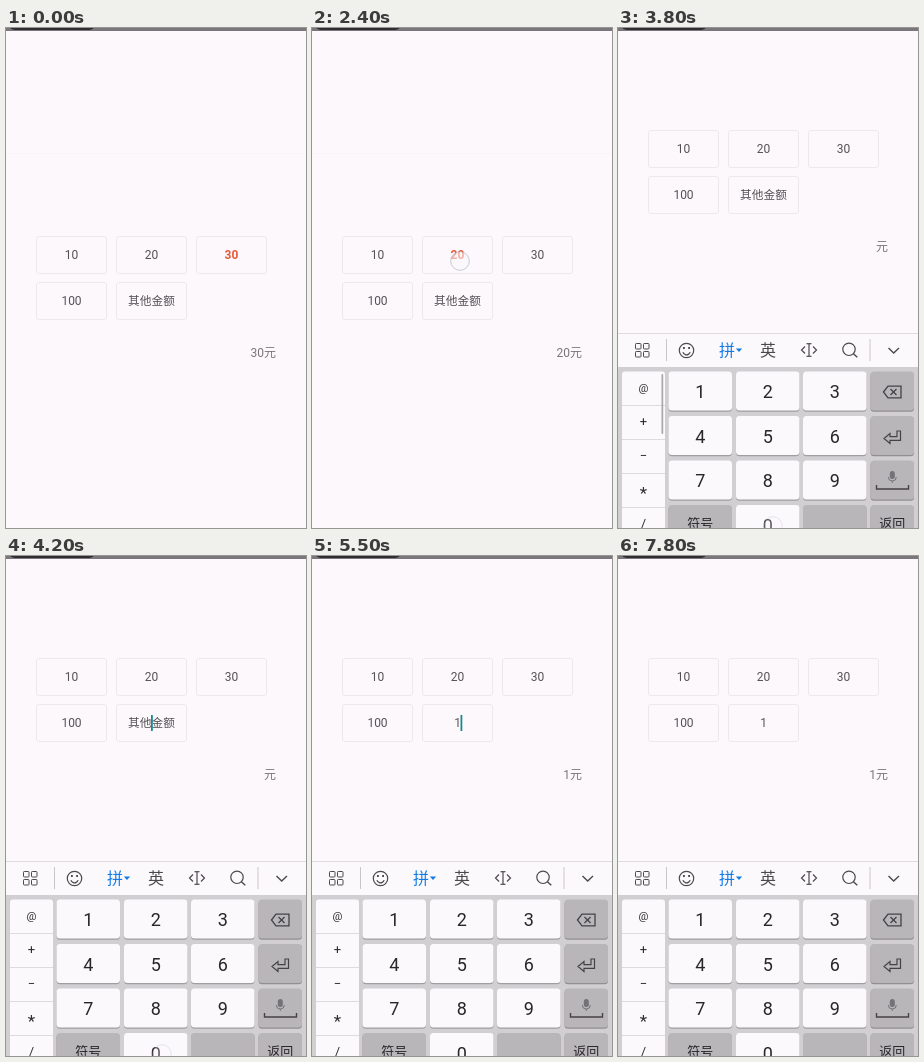
Recreate the animation shown at these times as an HTML page with a canvas. Size 300 by 500 pixels, loop 8000 ms.

```html
<!DOCTYPE html>
<html lang="zh-CN">
<head>
<meta charset="utf-8">
<title>金额选择</title>
<style>
  html, body { margin: 0; width: 100%; height: 100%; overflow: hidden; background: #fcf8fc; }
  canvas { display: block; width: 300px; height: 500px; }
</style>
</head>
<body>
<canvas id="stage" width="300" height="500"></canvas>
<script>
const ctx = document.getElementById('stage').getContext('2d');
const LOOP = 8000;
const TAP_LENGTH = 400;
const FONT = 'Roboto, "Noto Sans CJK SC", "Noto Sans CJK", sans-serif';
const BG = '#fcf8fc', INK = '#555256', ACCENT = '#e9593b', KEY = '#fcf9fd', KEY_DARK = '#b9b6ba';

const AMOUNTS = [
  { label: '10', x: 30, y: 208 }, { label: '20', x: 110, y: 208 }, { label: '30', x: 190, y: 208 },
  { label: '100', x: 30, y: 254 }, { label: '其他金额', x: 110, y: 254 }
];
const COLUMNS = [50.5, 118, 185, 252.5];
const ROWS = [343.5, 388, 432.5, 477];
const KEYS = [
  ['1', '2', '3', 'delete'], ['4', '5', '6', 'enter'],
  ['7', '8', '9', 'space'], ['符号', '0', '.', '返回']
];
const TAPS = [
  { at: 100, x: 56, y: 231 }, { at: 1700, x: 63, y: 233 }, { at: 2110, x: 148, y: 233 },
  { at: 2550, x: 150, y: 272 },
  { at: 3800, x: 155, y: 498, key: '0' }, { at: 4200, x: 156, y: 498, key: '0' },
  { at: 5100, x: 83, y: 366, key: '1' }, { at: 5510, x: 150, y: 367, key: '2' },
  { at: 6600, x: 268, y: 370, key: 'delete' }, { at: 7160, x: 268, y: 370, key: 'delete' }
];
const CARET_OFF = [[3500, 4000], [4800, 5200], [6000, 6550], [7100, 7300], [7800, 8000]];

const clamp = v => Math.max(0, Math.min(1, v));

// Latest value in a list of [start time, value] steps
const stepAt = (t, steps) => steps.filter(s => s[0] <= t).pop()[1];

function box(x, y, w, h, r, fill, stroke) {
  ctx.beginPath();
  ctx.roundRect(x, y, w, h, r);
  if (fill) { ctx.fillStyle = fill; ctx.fill(); }
  if (stroke) { ctx.strokeStyle = stroke; ctx.stroke(); }
}

function text(str, x, y, size, color, align = 'center', weight = 400) {
  ctx.font = `${weight} ${size}px ${FONT}`;
  ctx.textAlign = align;
  ctx.fillStyle = color;
  ctx.fillText(str, x, y);
}

function line(points, color, width = 1.2, close = false) {
  ctx.beginPath();
  for (let i = 0; i < points.length; i += 2) ctx.lineTo(points[i], points[i + 1]);
  if (close) ctx.closePath();
  ctx.strokeStyle = color;
  ctx.lineWidth = width;
  ctx.stroke();
  ctx.lineWidth = 1;
}

function arc(x, y, r, from, to, color, width = 1.2) {
  ctx.beginPath();
  ctx.arc(x, y, r, from, to);
  ctx.strokeStyle = color;
  ctx.lineWidth = width;
  ctx.stroke();
  ctx.lineWidth = 1;
}

function drawStatusBar() {
  ctx.fillStyle = '#7a767b';
  ctx.fillRect(0, 0, 300, 3);
  box(3, -10, 86, 12, 6, '#302d31');
}

function drawForm(t) {
  const raised = t >= 3000;
  const selected = stepAt(t, [[0, '30'], [200, '10'], [2200, '20'], [2800, '']]);
  const typed = stepAt(t, [[0, ''], [5200, '1'], [5600, '12'], [7400, '1']]);
  ctx.save();
  if (raised) ctx.translate(0, -106);
  else { ctx.fillStyle = '#f8f4f8'; ctx.fillRect(0, 125, 300, 1); }

  for (const { label, x, y } of AMOUNTS) {
    box(x + 0.5, y + 0.5, 70, 37, 2.5, null, '#ece8ec');
    const isInput = label === '其他金额';
    const shown = isInput && typed ? typed : label;
    const on = label === selected;
    text(shown, x + 35.5, y + 23.4, isInput && !typed ? 11.7 : 12, on ? ACCENT : INK, 'center', on ? 700 : 400);
  }
  text((selected || typed) + '元', 270, 329, 12, '#79767a', 'right');

  if (raised && !CARET_OFF.some(([a, b]) => t >= a && t < b)) {
    ctx.fillStyle = '#168a92';
    ctx.fillRect({ 0: 145, 1: 148.5, 2: 152 }[typed.length], 265, 1.8, 16);
  }
  ctx.restore();
}

function drawToolbar() {
  const c = '#4c494d';
  ctx.fillStyle = KEY;
  ctx.fillRect(0, 305, 300, 34);
  ctx.fillStyle = '#dedade';
  ctx.fillRect(0, 305, 300, 1);
  for (const x of [17.5, 25.5]) for (const y of [315.5, 323.5]) box(x, y, 5.5, 5.5, 0.8, null, c);
  line([48.5, 311, 48.5, 333], '#c9c6ca', 1);
  line([252, 311, 252, 333], '#c9c6ca', 1);

  arc(68.5, 322.5, 7.2, 0, Math.PI * 2, c);
  arc(68.5, 323, 3.8, 0.3, Math.PI - 0.3, c);
  ctx.fillStyle = c;
  ctx.fillRect(65, 319, 1.8, 2);
  ctx.fillRect(70.2, 319, 1.8, 2);

  text('拼', 109, 328, 16, '#147be5', 'center', 500);
  ctx.beginPath();
  ctx.moveTo(117.8, 320.5);
  ctx.lineTo(124.2, 320.5);
  ctx.lineTo(121, 324);
  ctx.fill();
  text('英', 150, 328, 16, c);

  line([187, 318.5, 183.5, 322, 187, 325.5], c);
  line([195, 318.5, 198.5, 322, 195, 325.5], c);
  line([191, 316, 191, 328], c);
  line([188.5, 315.7, 193.5, 315.7], c);
  line([188.5, 328.3, 193.5, 328.3], c);
  arc(231, 321.3, 6.2, 0, Math.PI * 2, c);
  line([235.4, 325.7, 239.3, 329.3], c, 1.4);
  line([270.5, 320, 275.7, 325, 281, 320], c, 1.4);
}

const ICONS = {
  delete() {
    line([265.5, 364, 270, 358.2, 283, 358.2, 283, 369.8, 270, 369.8], '#454246', 1.3, true);
    line([272.5, 361, 278.5, 367], '#454246', 1.3);
    line([278.5, 361, 272.5, 367], '#454246', 1.3);
  },
  enter() {
    line([266, 410.5, 272, 405.5, 272, 408.7, 279, 408.7, 279, 403, 282.5, 403,
      282.5, 412.3, 272, 412.3, 272, 415.5], '#454246', 1.2, true);
  },
  space() {
    box(271.8, 443, 5, 8, 2.5, '#757277');
    arc(274.3, 449, 4, 0, Math.PI, '#757277', 1);
    line([274.3, 453, 274.3, 455], '#757277', 1);
    line([258.5, 457, 258.5, 461, 290.5, 461, 290.5, 457], '#454246', 1.4);
  }
};

function drawKeys(t) {
  const pressed = TAPS.filter(p => p.key && t >= p.at + 50 && t < p.at + 320).map(p => p.key);
  ctx.fillStyle = '#d2cfd3';
  ctx.fillRect(0, 339, 300, 361);

  box(4, 343.5, 43, 190, 3, KEY);
  ['@', '+', '−', '*', '/'].forEach((s, i) => {
    const y = 364 + i * 34;
    text(s, 25.5, s === '*' ? y + 5 : y, s === '@' ? 11 : s === '*' ? 17 : 13, '#302d31');
    ctx.fillStyle = '#dedbdf';
    ctx.fillRect(4, 377 + i * 34, 43, 1);
  });
  const bar = clamp((4000 - t) / 200);
  if (bar > 0) {
    ctx.globalAlpha = bar;
    box(43.5, 346, 1.7, 60, 0.8, '#aaa7ab');
    ctx.globalAlpha = 1;
  }

  KEYS.forEach((row, r) => row.forEach((key, c) => {
    const x = COLUMNS[c], y = ROWS[r], w = c === 3 ? 43.5 : 63.5;
    const dark = c === 3 || key === '符号' || key === '.';
    const down = pressed.includes(key);
    box(x, y + 1, w, 39.3, 3.5, dark ? '#918e92' : '#a19ea2');
    box(x, y, w, 39, 3.5, dark ? (down ? '#969397' : KEY_DARK) : (down ? '#d9d6da' : KEY));
    if (ICONS[key]) ICONS[key]();
    else {
      const wide = key.length > 1;
      text(key, x + w / 2, y + (wide ? 23 : 26.5), wide ? 13 : 18, '#29262a');
    }
  }));
}

function drawKeyboard(t) {
  const rise = clamp((t - 3086) / 314);
  if (!rise) return;
  ctx.save();
  ctx.translate(0, Math.round(195 * (1 - rise)));
  drawToolbar();
  drawKeys(t);
  ctx.restore();
}

function drawTaps(t) {
  for (const { at, x, y } of TAPS) {
    const age = t - at;
    if (age < 0 || age >= TAP_LENGTH) continue;
    ctx.globalAlpha = Math.min(0.35 + age / 150, 1, (TAP_LENGTH - age) / 140);
    ctx.beginPath();
    ctx.arc(x, y, 9.3, 0, Math.PI * 2);
    ctx.fillStyle = 'rgba(250,248,252,0.72)';
    ctx.fill();
    ctx.strokeStyle = 'rgba(165,170,185,0.75)';
    ctx.stroke();
  }
  ctx.globalAlpha = 1;
}

function draw(now) {
  const t = now % LOOP;
  ctx.fillStyle = BG;
  ctx.fillRect(0, 0, 300, 500);
  drawForm(t);
  drawStatusBar();
  drawKeyboard(t);
  drawTaps(t);
}

const start = performance.now();
function tick() {
  draw(performance.now() - start);
  requestAnimationFrame(tick);
}
tick();
</script>
</body>
</html>
```
